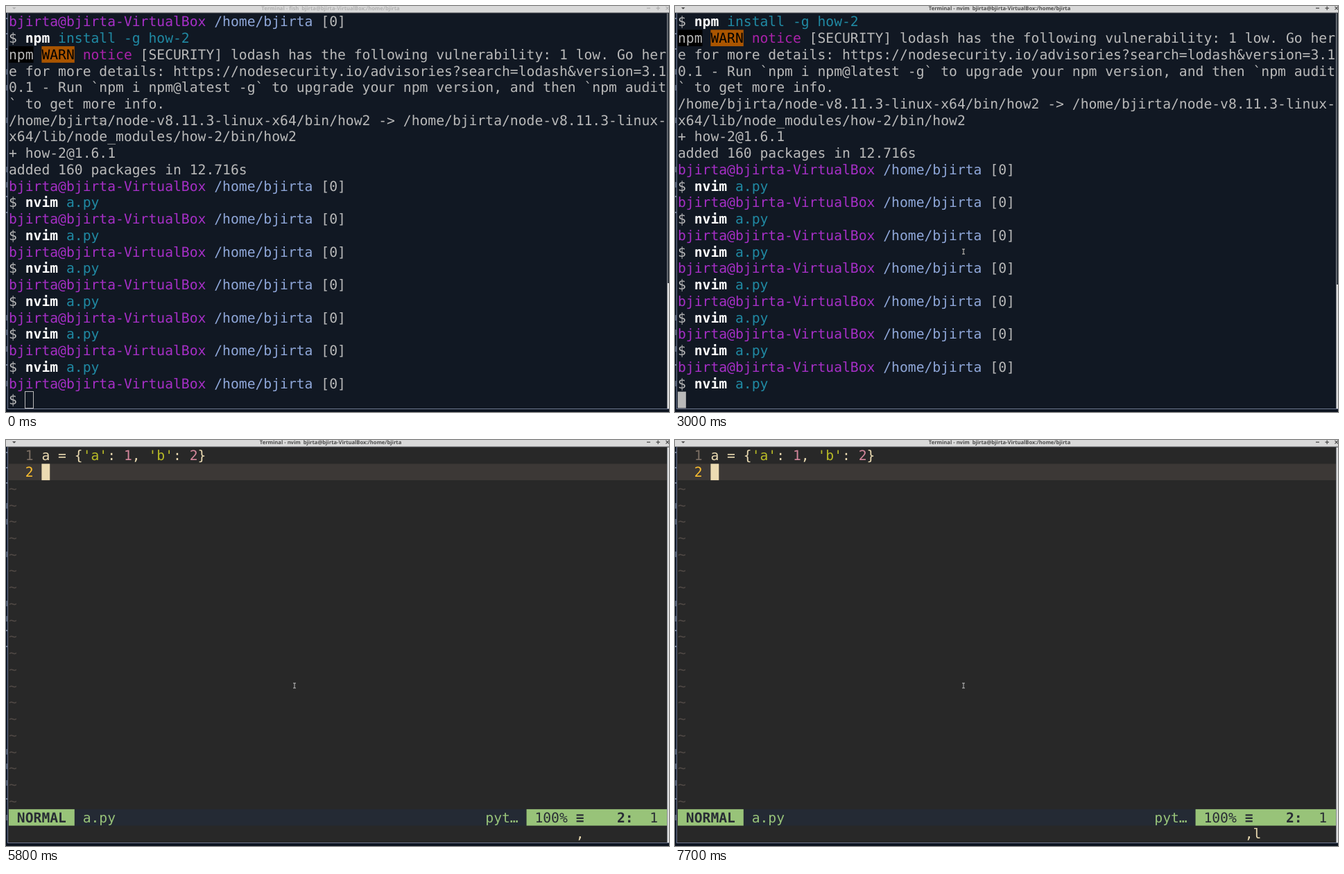
Write an HTML page with a canvas that moves like this. It is 956 px wide and 586 px high and loops after 8 s.

```html
<!DOCTYPE html>
<html lang="en">
<head>
<meta charset="utf-8">
<title>Terminal</title>
<style>
html, body { margin: 0; width: 100%; height: 100%; overflow: hidden; background: #101722; }
canvas { display: block; }
</style>
</head>
<body>
<canvas id="stage" width="956" height="586"></canvas>
<script>
const ctx = document.getElementById('stage').getContext('2d');
const LOOP = 8000, X0 = 4, Y0 = 10.6, CW = 11.85, RH = 23.74, BASE = 18.7;
const FONT = '19.68px "DejaVu Sans Mono", monospace';
const USER = 'bjirta', HOST = USER + '-VirtualBox', HOME = '/home/' + USER;

const SHELL = '#111823', GREY = '#b9b9b9', PURPLE = '#a62fc6', BLUE = '#8fa7d9', TEAL = '#2089a3';
const EDIT = '#282828', CREAM = '#ebdbb2', LINE = '#3c3836', DIM = '#504945', GREEN = '#98c379';
const LIME = '#b8bb26', PINK = '#d3869b', DARK = '#282c34';

// A line is a list of runs: [text, colour, bold, background]
const plain = s => [[s, GREY]];
const prompt = [[USER + '@' + HOST, PURPLE], [' ' + HOME, BLUE], [' [0]', GREY]];
const command = (name, args) => [['$ ', GREY], [name, '#fff', true], [' ' + args, TEAL]];
const nvim = command('nvim', 'a.py');
const node = HOME + '/node-v8.11.3-linux-';

const history = [
  prompt,
  command('npm', 'install -g how-2'),
  [['npm', GREY, false, '#000'], [' ', GREY], ['WARN', '#000', false, '#aa5500'], [' notice', '#aa22aa'],
   [' [SECURITY] lodash has the following vulnerability: 1 low. Go her', GREY]],
  plain('e for more details: https://nodesecurity.io/advisories?search=lodash&version=3.1'),
  plain('0.1 - Run `npm i npm@latest -g` to upgrade your npm version, and then `npm audit'),
  plain('` to get more info.'),
  plain(node + 'x64/bin/how2 -> ' + node),
  plain('x64/lib/node_modules/how-2/bin/how2'),
  plain('+ how-2@1.6.1'),
  plain('added 160 packages in 12.716s')
];
for (let i = 0; i < 6; i++) history.push(prompt, nvim);
history.push(prompt);

const messages = ['18391:fish,one', '18391:fish,w3m', '18423:fish,two', '18423:fish,how2'];

function rect(x, y, w, h, color) {
  ctx.fillStyle = color;
  ctx.fillRect(x, y, w, h);
}

function cells(row, col, n, color) {
  rect(X0 + col * CW, Y0 + row * RH, n * CW, RH, color);
}

function fullRow(row, color) {
  rect(X0, Y0 + row * RH, 949, RH, color);
}

function write(row, col, runs) {
  for (const [text, color, bold, back] of runs) {
    if (back) cells(row, col, text.length, back);
    ctx.font = (bold ? 'bold ' : '') + FONT;
    ctx.fillStyle = color;
    for (const ch of text) {
      if (ch !== ' ') ctx.fillText(ch, X0 + col * CW, Y0 + row * RH + BASE);
      col++;
    }
  }
}

function stroke(color, width, ...paths) {
  ctx.strokeStyle = color;
  ctx.lineWidth = width;
  ctx.beginPath();
  for (const [x, y, ...rest] of paths) {
    ctx.moveTo(x, y);
    for (let i = 0; i < rest.length; i += 2) ctx.lineTo(rest[i], rest[i + 1]);
  }
  ctx.stroke();
}

function drawFrame(program, focused, thumbTop) {
  rect(0, 0, 956, 10, '#d9d9d9');
  rect(0, 9.5, 956, 1, '#4a4d52');
  const ink = focused ? '#4b4b4b' : '#b0b0b0';
  ctx.font = 'bold 7.6px "Noto Sans", "Open Sans", sans-serif';
  ctx.textAlign = 'center';
  ctx.fillStyle = ink;
  ctx.fillText(`Terminal - ${program}\u00a0 ${USER}@${HOST}:${HOME}`, 468, 5.8);
  ctx.textAlign = 'left';
  ctx.beginPath();
  ctx.moveTo(9, 2);
  ctx.lineTo(14.5, 2);
  ctx.lineTo(11.75, 4.8);
  ctx.fill();
  stroke(ink, 1.2, [924, 3.2, 929, 3.2], [937.5, 3.2, 943, 3.2], [940.2, 0.4, 940.2, 6],
    [951.5, 0.8, 956, 5.4], [951.5, 5.4, 956, 0.8]);

  // sliver of the window behind
  rect(0, 10, 2, 576, '#0e1828');
  for (const y of [95, 118, 165, 236, 258, 450, 471, 495, 545]) rect(0.4, y - 4, 1.3, 8, '#66738a');
  for (const y of [18, 40, 62, 275, 298, 518]) rect(0, y - 1, 2, 2, '#66738a');

  rect(2, 10, 1, 571, '#6f7890');
  rect(953, 10.5, 3, 570.5, '#30363f');
  rect(953, 10.5, 1, 570.5, '#8c9096');
  rect(954, thumbTop, 2, 581 - thumbTop, '#dedede');
  rect(2, 581, 954, 1, '#6f7890');
  rect(0, 582, 956, 4, '#0e1521');
}

function drawShell(t) {
  const launched = t >= 3000, focused = t >= 1800;
  const lines = launched ? history.slice(1) : history;
  lines.forEach((line, row) => write(row, 0, line));
  if (launched) {
    write(22, 0, nvim);
    cells(23, 0, 1, GREY);
    return;
  }
  const typed = t >= 2800;
  write(23, 0, typed ? nvim : plain('$ '));
  if (focused) cells(23, typed ? 12 : 2, 1, GREY);
  else {
    ctx.strokeStyle = GREY;
    ctx.lineWidth = 1;
    ctx.strokeRect(27.5, 556.5, 12, 24);
  }
}

function drawEditor(t) {
  const fileInfo = [['"a.py" 2L, 22C', CREAM]];
  if (t < 3500) {
    write(23, 0, fileInfo);
    cells(23, 14, 1, CREAM);
    return;
  }
  const listing = t >= 6500 && t < 7000, busy = t >= 6200 && t < 7000;
  write(0, 2, [['1', '#7c6f64'], [' a = {', CREAM], ["'a'", LIME], [': ', CREAM], ['1', PINK],
    [', ', CREAM], ["'b'", LIME], [': ', CREAM], ['2', PINK], ['}', CREAM]]);
  fullRow(1, LINE);
  write(1, 2, [['2', '#fabd2f']]);
  for (let row = 2; row < (listing ? 18 : 22); row++) write(row, 0, [['~', DIM]]);

  if (listing) {
    fullRow(18, DIM);
    messages.forEach((m, i) => write(19 + i, 0, [[`"term://.//${m}"  22 lines --4%--`, CREAM]]));
    write(23, 0, [['Press ENTER or type command to continue', '#fe8019', true]]);
    cells(23, 39, 1, CREAM);
    return;
  }
  fullRow(22, '#242a34');
  write(22, 0, [[' NORMAL ', DARK, true, GREEN], [' a.py', GREEN]]);
  write(22, 58, [['pyt…', GREEN]]);
  rect(X0 + 63 * CW, Y0 + 22 * RH, 953 - X0 - 63 * CW, RH, GREEN);
  write(22, 64, [['100% ', DARK], ['≡    2:', DARK, true], ['  1', DARK]]);

  if (busy) cells(23, 0, 1, CREAM);
  else cells(1, 4, 1, CREAM);
  if (t < 4100) write(23, 0, fileInfo);
  const keys = busy ? '' : t >= 7700 ? ',l' : t >= 7400 ? ',' : t >= 7000 ? '' :
    t >= 5900 ? ',l' : t >= 5800 ? ',' : '';
  write(23, 69, [[keys, CREAM]]);
}

// Pointer moves: start time, number of 100 ms steps, end point
const moves = [[100, 5, 147, 225], [900, 3, 313, 265], [1400, 5, 416, 354.5]];

function drawPointer(t) {
  let x = 137, y = 166;
  for (const [start, steps, ex, ey] of moves) {
    const k = Math.max(0, Math.min(1, (Math.floor((t - start) / 100) + 1) / steps));
    x += (ex - x) * k;
    y += (ey - y) * k;
  }
  const beam = [[x, y - 3.5, x, y + 3.5], [x - 2, y - 3.5, x + 2, y - 3.5], [x - 2, y + 3.5, x + 2, y + 3.5]];
  stroke('#111', 2, ...beam);
  stroke('#d0d0d0', 1, ...beam);
}

function draw(now) {
  const t = now % LOOP, editing = t >= 3400;
  ctx.textRendering = 'geometricPrecision';
  rect(0, 0, 956, 586, editing ? EDIT : SHELL);
  drawFrame(t >= 3000 ? 'nvim' : 'fish', t >= 1800, editing ? 10.5 : t >= 3000 ? 402 : 400);
  if (editing) drawEditor(t);
  else drawShell(t);
  drawPointer(t);
}

const begin = performance.now();
function tick() {
  draw(performance.now() - begin);
  requestAnimationFrame(tick);
}
tick();
</script>
</body>
</html>
```
